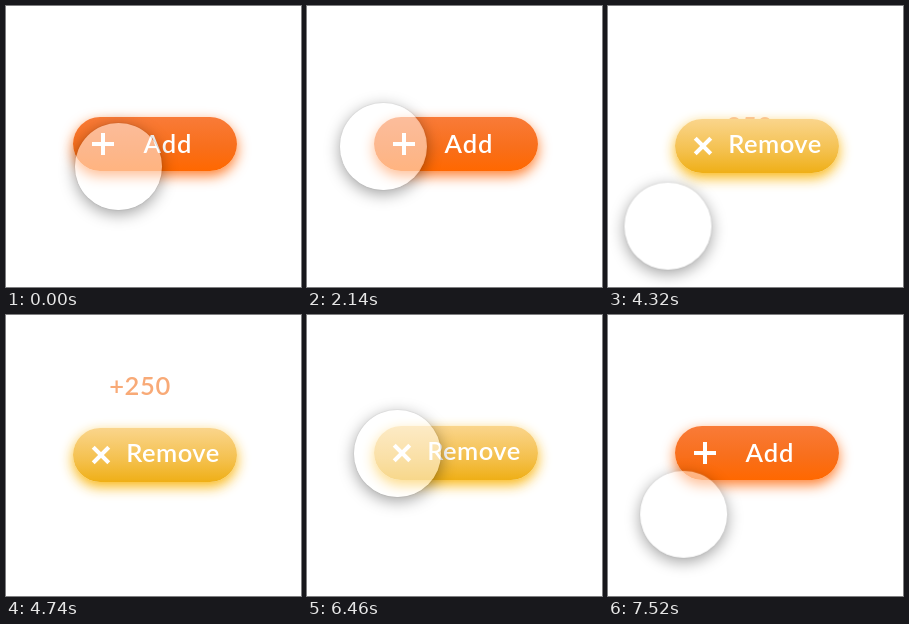
An HTML page without scripts for the animation above (7540 ms loop, 295 by 281 pixels).

```html
<!DOCTYPE html>
<html lang="en">
<head>
<meta charset="utf-8">
<title>Add / Remove button</title>
<style>
  :root { --loop: 7540ms; }
  html, body { margin: 0; width: 100%; height: 100%; overflow: hidden; background: #fff; }
  body { position: relative; font: 600 25.5px/30px Lato, "Open Sans", sans-serif; }
  div, span { position: absolute; }
  .stage { left: 0; top: 0; width: 295px; height: 281px; overflow: hidden; }
  .button, .button *, .points, .touch { animation: 0s linear infinite; animation-duration: var(--loop); }

  .button { left: 67px; top: 111px; width: 164px; height: 54px; color: #fff; animation-name: press; }
  .face { inset: 0; border-radius: 27px; }
  .add { background: linear-gradient(#f97b38, #f86f1c 55%, #ff6800); box-shadow: 0 5px 13px rgba(255, 104, 10, .85); }
  .remove { background: linear-gradient(#fad58c, #f4c04c 60%, #efaf16); box-shadow: 0 5px 13px rgba(250, 180, 10, .95); }
  .face.add, .label.add-text { animation-name: off; }
  .face.remove, .label.remove-text { animation-name: on; }
  .label { width: 130px; text-align: center; white-space: nowrap; }
  .add-text { left: 30px; top: 11px; letter-spacing: 1px; }
  .remove-text { left: 35px; top: 9px; letter-spacing: .5px; }

  .icon { left: 19px; top: 16px; width: 22px; height: 22px; animation-name: turn; }
  .icon::before, .icon::after { content: ""; position: absolute; background: #fff; }
  .icon::before { left: 0; top: 9px; width: 22px; height: 4px; }
  .icon::after { left: 9px; top: 0; width: 4px; height: 22px; }

  .points { left: 84px; top: -17px; width: 100px; text-align: center; letter-spacing: .6px; color: #f58136; opacity: 0; animation-name: rise; }

  .touch {
    left: -43.5px; top: -43.5px; width: 87px; height: 87px; border-radius: 50%;
    background: rgba(255, 255, 255, .5); box-shadow: 0 4px 16px rgba(0, 0, 0, .38), 0 0 2px rgba(0, 0, 0, .15);
    animation-name: wander;
  }

  @keyframes wander {
    0% { transform: translate(112px, 160px); animation-timing-function: ease-out; }
    7.96%, 13.53% { transform: translate(106px, 142px); animation-timing-function: ease-in-out; }
    18.57%, 20.42% { transform: translate(87px, 140px); }
    21.22%, 28.12% { transform: translate(89px, 140px); }
    28.38% { transform: translate(76px, 140px); animation-timing-function: ease-out; }
    36.07%, 38.2% { transform: translate(51px, 140px); animation-timing-function: ease-in-out; }
    45.62% { transform: translate(58px, 138px); animation-timing-function: ease-out; }
    49.5%, 54.4% { transform: translate(88px, 137px); animation-timing-function: ease-in; }
    59.4% { transform: translate(18px, 340px); }
    71.2% { transform: translate(18px, 340px); animation-timing-function: ease-out; }
    75.86% { transform: translate(52px, 170px); }
    78.25% { transform: translate(64px, 153px); animation-timing-function: ease-out; }
    85.68%, 90.7% { transform: translate(90px, 138px); animation-timing-function: ease-in; }
    95.2% { transform: translate(40px, 340px); }
    98.1% { transform: translate(74px, 340px); }
    99.74% { transform: translate(74px, 200px); }
    100% { transform: translate(112px, 160px); }
  }
  @keyframes press {
    0%, 53.6% { transform: none; }
    55%, 65.5% { transform: translateY(2px); }
    69.4%, 90% { transform: none; }
    91.4%, 94% { transform: translateY(2px); }
    97%, 100% { transform: none; }
  }
  @keyframes on {
    0%, 54.1% { opacity: 0; }
    55.4%, 90.5% { opacity: 1; }
    91.8%, 100% { opacity: 0; }
  }
  @keyframes off {
    0%, 54.1% { opacity: 1; }
    55.4%, 90.5% { opacity: 0; }
    91.8%, 100% { opacity: 1; }
  }
  @keyframes turn {
    0%, 54.1% { transform: none; }
    55.4%, 90.5% { transform: translateX(-2px) rotate(45deg); }
    91.8%, 100% { transform: none; }
  }
  @keyframes rise {
    0%, 56.4% { transform: translateY(138px); opacity: 0; }
    58.1% { transform: translateY(106px); opacity: .8; animation-timing-function: ease-out; }
    62.86% { transform: translateY(72px); opacity: .68; }
    68.2%, 100% { transform: translateY(58px); opacity: 0; }
  }
</style>
</head>
<body>
  <div class="stage">
    <div class="points">+250</div>
    <div class="button">
      <div class="face add"></div>
      <div class="face remove"></div>
      <div class="icon"></div>
      <span class="label add-text">Add</span>
      <span class="label remove-text">Remove</span>
    </div>
    <div class="touch"></div>
  </div>
</body>
</html>
```
